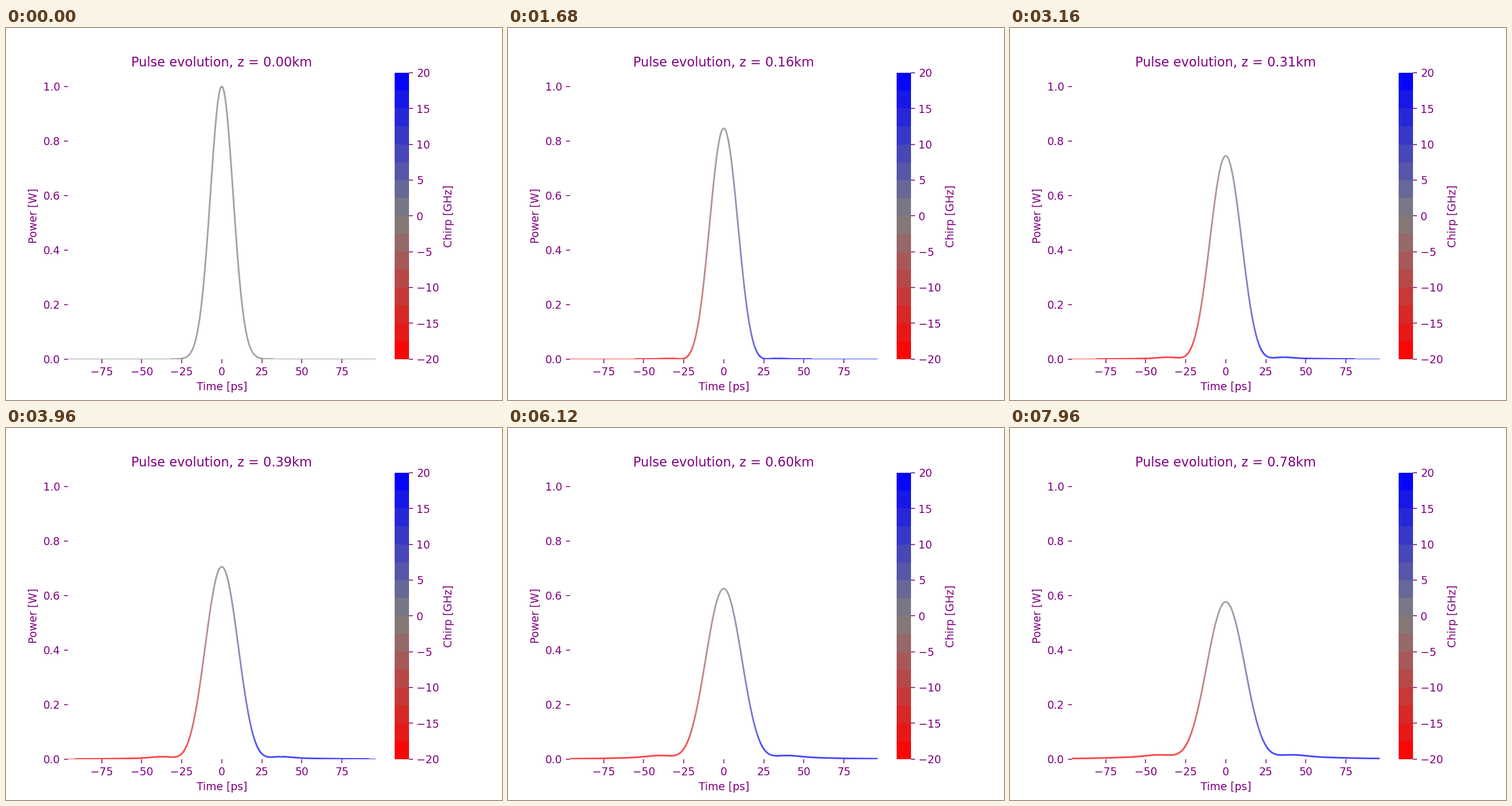
A matplotlib script that plays this animation: 864x648 px, repeating every 8 s.

```python
import numpy as np
import matplotlib.pyplot as plt
from matplotlib.animation import FuncAnimation
from matplotlib.cm import ScalarMappable
from matplotlib.collections import LineCollection
from matplotlib.colors import LinearSegmentedColormap, ListedColormap, Normalize

FRAMES, INTERVAL = 200, 40
DZ = 1 / 256            # km per frame
T0 = 10.0               # Gaussian width, ps
QUARTIC = 0.5           # beta4 / (24 T0^4), 1/km
T_MAX, P_MAX = 96.0, 1.05
CHIRP_MAX = 20.0        # GHz
PURPLE = "purple"
INK = 0.72              # strength of the sloped parts of the curve
FLAT = 0.01             # px per ps below which the curve counts as level


def propagate():
    """Power and chirp of a Gaussian pulse under quartic dispersion."""
    x = np.arange(0, 10, 0.004)
    z = np.arange(FRAMES) * DZ
    weight = np.exp(-x**2 / 2)
    weight[0] /= 2
    weight /= weight.sum()
    spectrum = weight[:, None] * np.exp(1j * QUARTIC * np.outer(x**4, z))
    t = np.linspace(0, T_MAX, 961)
    arg = np.outer(t / T0, x)
    field = np.cos(arg) @ spectrum
    slope = -np.sin(arg) @ (x[:, None] * spectrum)
    power = np.abs(field) ** 2
    chirp = -(slope * field.conj()).imag / (power + 1e-60)
    chirp *= 1000 / (2 * np.pi * T0)
    return (np.concatenate([-t[:0:-1], t]),
            np.concatenate([power[:0:-1], power]).T,
            np.concatenate([-chirp[:0:-1], chirp]).T)


time, powers, chirps = propagate()
cmap = LinearSegmentedColormap.from_list("chirp", ["red", "gray", "blue"])
norm = Normalize(-CHIRP_MAX, CHIRP_MAX)

fig, ax = plt.subplots(figsize=(6.4, 4.8), dpi=135)
bands = ListedColormap(cmap((np.arange(16) + 0.5) / 16))
bar = fig.colorbar(ScalarMappable(norm, bands), ax=ax,
                   ticks=np.arange(-20, 21, 5))
bar.set_label("Chirp [GHz]", color=PURPLE)
bar.outline.set_visible(False)
bar.ax.minorticks_off()
bar.ax.tick_params(colors=PURPLE)

ax.set_xlim(-T_MAX, T_MAX)
ax.set_ylim(0, P_MAX)
ax.set_xticks(np.arange(-75, 76, 25))
ax.set_yticks(np.arange(6) / 5)
ax.set_xlabel("Time [ps]", color=PURPLE)
ax.set_ylabel("Power [W]", color=PURPLE)
ax.tick_params(colors=PURPLE)
ax.spines[:].set_visible(False)
title = ax.set_title("", color=PURPLE)

curve = LineCollection([], linewidths=1.5)
ax.add_collection(curve, autolim=False)

box = ax.get_window_extent()
PX_T = box.width / (2 * T_MAX)
PX_P = box.height / P_MAX


def pieces(power, chirp):
    """Cut the curve into short coloured strokes."""
    arc = np.hypot(np.diff(time) * PX_T, np.diff(power) * PX_P / 2)
    s = np.concatenate([[0], np.cumsum(arc)])
    t = np.interp(np.linspace(0, s[-1], int(np.ceil(s[-1])) + 1), s, time)
    p = np.interp(t, time, power)
    mid = (t[1:] + t[:-1]) / 2
    steep = np.interp(mid, time, np.abs(np.gradient(power, time)) * PX_P)
    flat = steep < FLAT

    start = np.column_stack([t, p])[:-1]
    step = np.column_stack([np.diff(t), np.diff(p)])
    step[~flat] *= 1.3      # slight overlap hides the joins
    step[flat, 1] = 0
    segments = np.stack([start, start + step], axis=1)

    colors = cmap(norm(np.interp(mid, time, chirp)))
    ink = np.where(flat, 1, INK)[:, None]
    colors[:, :3] = 1 - (1 - colors[:, :3]) * ink
    return segments, colors


def update(i):
    segments, colors = pieces(powers[i], chirps[i])
    curve.set_segments(segments)
    curve.set_color(colors)
    title.set_text(f"Pulse evolution, z = {i * DZ:.2f}km")
    return curve, title


anim = FuncAnimation(fig, update, frames=FRAMES, interval=INTERVAL,
                     repeat=True, repeat_delay=0, blit=False)
plt.show()
```
